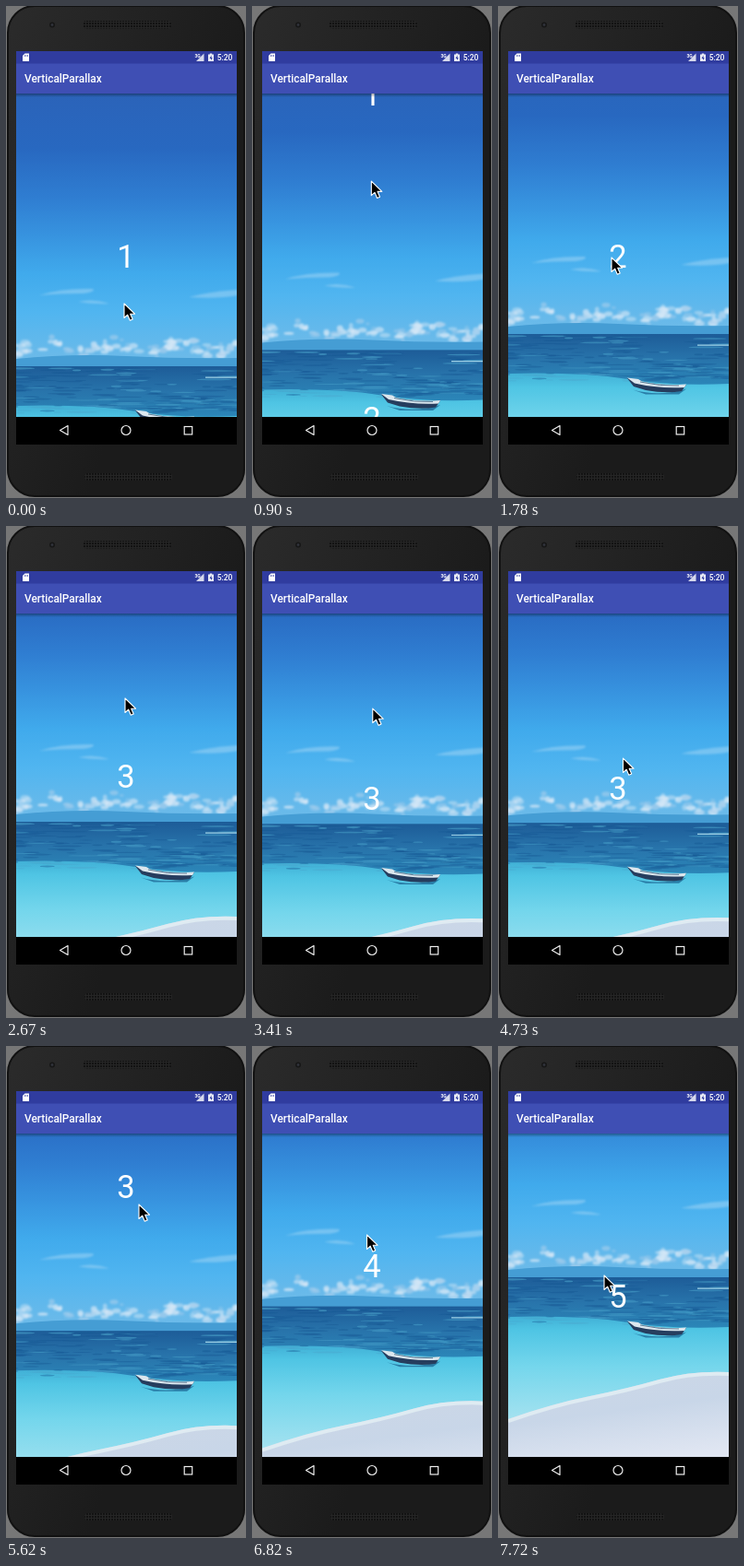
An HTML page for the animation above (8000 ms loop, 260 by 534 pixels).

```html
<!DOCTYPE html>
<html lang="en">
<head>
<meta charset="utf-8">
<title>VerticalParallax</title>
<style>
html, body { margin: 0; width: 100%; height: 100%; overflow: hidden; background: #777; }
svg { display: block; width: 100vw; height: 100vh; }
text { font-family: Roboto, Arial, sans-serif; fill: #fff; }
</style>
</head>
<body>
<svg viewBox="0 0 260 534">
  <defs>
    <linearGradient id="body" x1="0" y1="0" x2=".7" y2=".5">
      <stop offset="0" stop-color="#2b2b2b"/>
      <stop offset="1" stop-color="#1b1b1b"/>
    </linearGradient>
    <linearGradient id="sky" gradientUnits="userSpaceOnUse" x1="0" y1="95" x2="0" y2="391">
      <stop offset="0" stop-color="#2b63b9"/>
      <stop offset=".2" stop-color="#2868c0"/>
      <stop offset=".38" stop-color="#2f7dd1"/>
      <stop offset=".52" stop-color="#3793df"/>
      <stop offset=".66" stop-color="#40aaec"/>
      <stop offset=".8" stop-color="#50b5f0"/>
      <stop offset="1" stop-color="#70bbe8"/>
    </linearGradient>
    <linearGradient id="sea" gradientUnits="userSpaceOnUse" x1="0" y1="391" x2="0" y2="551">
      <stop offset="0" stop-color="#2b78ae"/>
      <stop offset=".24" stop-color="#3daad2"/>
      <stop offset=".36" stop-color="#4fc5e4"/>
      <stop offset=".6" stop-color="#74d6ec"/>
      <stop offset="1" stop-color="#a8e3f0"/>
    </linearGradient>
    <linearGradient id="deep" x1="0" y1="0" x2="0" y2="1">
      <stop offset="0" stop-color="#1d5c98"/>
      <stop offset=".5" stop-color="#2874ab"/>
      <stop offset="1" stop-color="#2b86b8"/>
    </linearGradient>
    <linearGradient id="sand" x1="0" y1="0" x2=".3" y2="1">
      <stop offset="0" stop-color="#cdd7e6"/>
      <stop offset=".5" stop-color="#c8d6e8"/>
      <stop offset="1" stop-color="#e0e6f2"/>
    </linearGradient>
    <linearGradient id="shade" x1="0" y1="0" x2="0" y2="1">
      <stop offset="0" stop-opacity=".35"/>
      <stop offset="1" stop-opacity="0"/>
    </linearGradient>
    <pattern id="mesh" width="3" height="3" patternUnits="userSpaceOnUse">
      <rect width="3" height="3" fill="#252525"/>
      <circle cx="1" cy="1" r=".9" fill="#090909"/>
    </pattern>
    <filter id="soft" x="-20%" y="-50%" width="140%" height="200%"><feGaussianBlur stdDeviation=".9"/></filter>
    <clipPath id="page"><rect x="11" y="95" width="239" height="351"/></clipPath>
  </defs>

  <rect width="260" height="534" fill="#777"/>
  <rect x="2" y="0" width="256" height="532" rx="29" fill="url(#body)" stroke="#111" stroke-width="2"/>
  <circle cx="50" cy="20.5" r="3" fill="#171717"/>
  <circle cx="50" cy="20.5" r="1.4" fill="#30323a"/>
  <rect x="83" y="16" width="96" height="8.5" rx="4" fill="url(#mesh)"/>
  <rect x="85" y="507" width="95" height="8" rx="4" fill="url(#mesh)"/>
  <rect x="11" y="49" width="239" height="427" fill="#000"/>

  <g clip-path="url(#page)">
    <g id="scene">
      <rect x="11" y="90" width="240" height="302" fill="url(#sky)"/>
      <g fill="#a4d6f5" opacity=".5" filter="url(#soft)">
        <path d="M36 314Q60 306 94 307Q98 310 84 312Q58 312 36 314Z"/>
        <path d="M198 316Q220 310 251 308V314Q230 318 198 316Z"/>
        <path d="M78 321Q95 317 112 323Q98 324 78 321Z"/>
      </g>
      <g id="clouds" filter="url(#soft)"></g>
      <path d="M11 383Q70 377 130 380T251 382V393H11Z" fill="#459dd4"/>
      <rect x="11" y="391" width="240" height="210" fill="url(#sea)"/>
      <path d="M11 391H251V445Q190 448 140 440T11 434Z" fill="url(#deep)"/>
      <g id="waves"></g>
      <path d="M216 402.500H251V403.700H216Z" fill="#9fd3e8"/>
      <path id="beach" d="M11 545Q60 528 100 520T175 502T251 494V600H11Z" fill="url(#sand)"/>
      <path d="M11 547Q60 530 100 522T175 504T251 496" fill="none" stroke="#dfebf2" stroke-width="4"/>
      <g transform="translate(0 1.5)">
        <path d="M146 450Q175 458 204 449L196 455H160Z" fill="#17608f" opacity=".7"/>
        <path d="M140 437.500L152 440.500Q172 445.500 204 444.500L199 451.500Q182 454.500 160 450.500L147 446.500Z" fill="#263d5e"/>
        <path d="M140 437L152 438.500L156 441Q178 446 204 444L202 447.500Q174 449 148 443Z" fill="#dce7ee"/>
        <path d="M154 441.500Q176 446.500 196 445.500" fill="none" stroke="#5b7d98"/>
      </g>
    </g>
    <g id="digits" text-anchor="middle" font-size="34.500"></g>
  </g>

  <rect x="11" y="95" width="239" height="4" fill="url(#shade)"/>
  <rect x="11" y="49" width="239" height="14" fill="#303c9f"/>
  <rect x="11" y="62.500" width="239" height="32.500" fill="#3f4fb4"/>
  <text x="20" y="82.800" font-size="11.850" font-weight="500">VerticalParallax</text>
  <path d="M20.500 51.500H25V60H18V54Z" fill="#fff"/>
  <path d="M20.500 53V55M22 53V55M23.500 53V55" stroke="#303c9f" stroke-width=".6"/>
  <text x="204.500" y="55.500" font-size="5" font-weight="700">3G</text>
  <path d="M214.500 51.500V60H206Z" fill="#fff" opacity=".8"/>
  <path d="M220.800 51.500H223.200V52.500H225V60H219V52.500H220.800Z" fill="#fff" opacity=".9"/>
  <path d="M222.500 53.500L220.500 57H222V59L223.700 56H222.500Z" fill="#303c9f"/>
  <text x="228.700" y="59.200" font-size="8.500" font-weight="500">5:20</text>
  <g fill="none" stroke="#eee" stroke-width="1.200">
    <path d="M67 455.500V465.500L58.500 460.500Z" stroke-linejoin="round"/>
    <circle cx="130" cy="460.500" r="5"/>
    <rect x="193.200" y="456.500" width="8.500" height="8.500"/>
  </g>
  <path id="cursor" d="M0 0V15.500L3.700 12.200L6.300 18.300L9.200 17L6.700 11.200H11.500Z" fill="#000" stroke="#fff" stroke-width="1.100" stroke-linejoin="round"/>
</svg>
<script>
const LOOP = 8000, TICK = 148.2, PAGE = 352, PARALLAX = 35;
const $ = id => document.getElementById(id);
const clamp = p => Math.min(1, Math.max(0, p));
const ease = p => p * p * (3 - 2 * p);
const progress = (tick, from, to) => clamp((tick - from) / (to - from));

let seed = 7;
const rand = (a, b) => {
  seed = (seed * 16807) % 2147483647;
  return a + (b - a) * seed / 2147483647;
};

function add(parent, tag, attrs) {
  const el = document.createElementNS("http://www.w3.org/2000/svg", tag);
  for (const key in attrs) el.setAttribute(key, attrs[key]);
  return parent.appendChild(el);
}

// Low bank of cumulus over the horizon
for (let i = 0; i < 90; i++) {
  const x = rand(8, 252);
  const crest = 367 + 4 * Math.sin(x / 11) + 2 * Math.sin(x / 5);
  add($("clouds"), "ellipse", {
    cx: x, cy: crest + rand(-4, 10), rx: rand(2, 6), ry: rand(1.5, 3.5),
    fill: i % 3 ? "#d8e9f7" : "#a4cdec", opacity: rand(.4, .8)
  });
}

// Dark and light ripples, fading towards the shallows
for (let i = 0; i < 170; i++) {
  const depth = rand(0, 1);
  add($("waves"), "ellipse", {
    cx: rand(5, 255), cy: 393 + depth * 49, rx: rand(4, 21), ry: rand(.4, 1.1),
    fill: i % 3 ? "#185a95" : "#4aa3cb", opacity: .6 - depth * .2
  });
}

const digits = [1, 2, 3, 4, 5].map(n => {
  const el = add($("digits"), "text", { x: 130 });
  el.textContent = n;
  return el;
});

// Each flip turns one page; between the second and third the page is tugged down
const FLIP_STARTS = [3.5, 12.5, 36.05, 45.05], FLIP_TICKS = 5;

function scrollAt(tick) {
  const pages = FLIP_STARTS.reduce((sum, s) => sum + ease(progress(tick, s, s + FLIP_TICKS)), 0);
  return pages - .0915 * Math.sin(Math.PI * progress(tick, 19, 34));
}

// Pointer turning points: [tick, x, y]
const POINTER = [
  [3, 128, 323], [8, 130, 118], [12, 123, 273], [15, 127, 125], [18, 129, 187], [27, 132, 206],
  [36, 138, 285], [38, 144, 172], [46, 124.5, 205], [48, 121, 130], [51, 113, 256], [52, 115, 249]
];

function pointerAt(tick) {
  let [, x, y] = POINTER[0];
  for (let i = 1; i < POINTER.length; i++) {
    const [from, x0, y0] = POINTER[i - 1], [to, x1, y1] = POINTER[i];
    const p = ease(progress(tick, from, to));
    x += (x1 - x0) * p;
    y += (y1 - y0) * p;
  }
  return [x, y];
}

function draw(time) {
  const tick = Math.floor((time + 15) / TICK);
  const scroll = scrollAt(tick);
  $("scene").setAttribute("transform", `translate(0 ${-PARALLAX * scroll})`);
  digits.forEach((el, i) => el.setAttribute("y", 284.3 + (i - scroll) * PAGE));
  $("cursor").setAttribute("transform", `translate(${pointerAt(tick)})`);
}

const start = performance.now();
function frame() {
  draw((performance.now() - start) % LOOP);
  requestAnimationFrame(frame);
}
frame();
</script>
</body>
</html>
```
